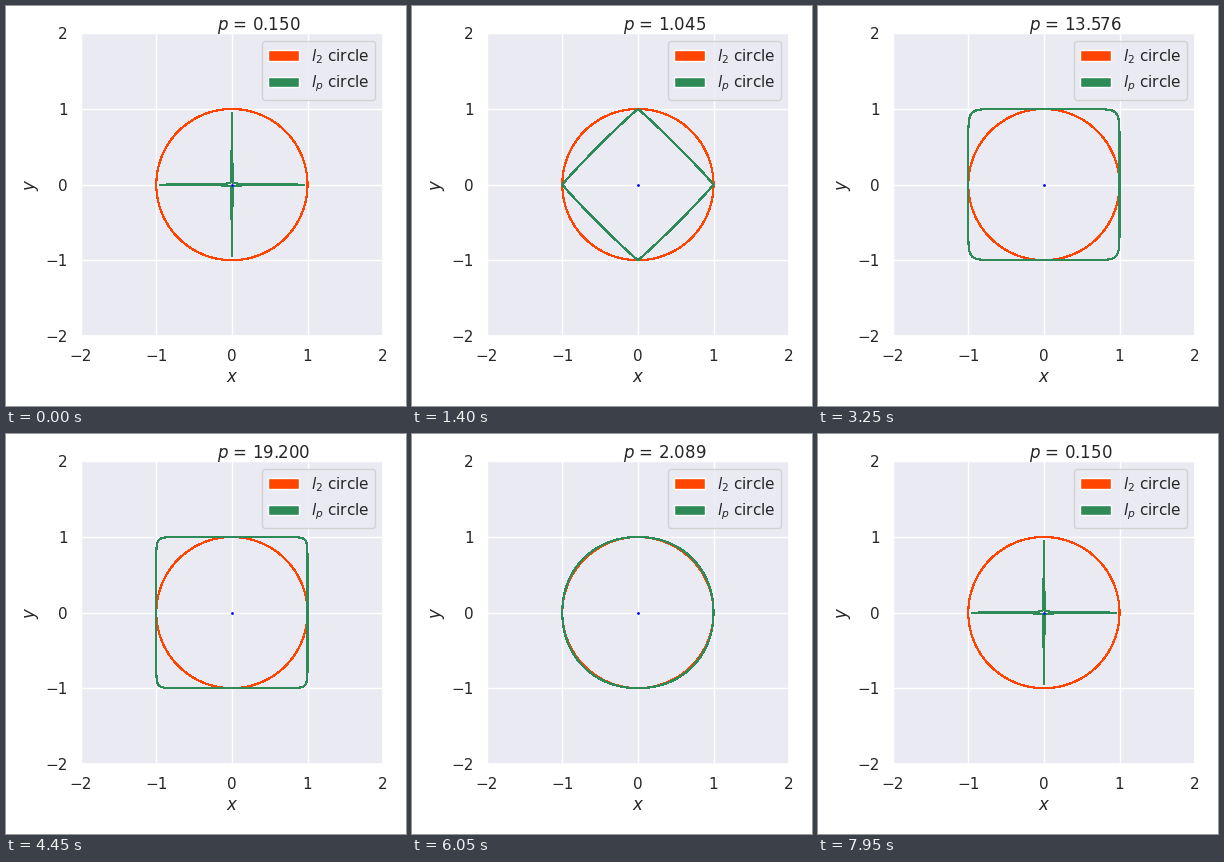
Recreate the animation shown at these times as a matplotlib script. Size 400 px wide and 400 px high, loop 8 s.

```python
import numpy as np
import matplotlib.pyplot as plt
from matplotlib.animation import FuncAnimation
from matplotlib.patches import Patch

FRAMES, INTERVAL = 160, 50
LAST_STEP = 76
SIZE = 400
INK = "0.15"

plt.rcParams.update({
    "font.family": "DejaVu Sans", "font.size": 12,
    "axes.labelsize": 12, "legend.fontsize": 11,
    "xtick.labelsize": 11, "ytick.labelsize": 11,
    "text.color": INK, "axes.labelcolor": INK,
    "xtick.color": INK, "ytick.color": INK,
    "axes.facecolor": "#EAEAF2", "axes.edgecolor": "white",
    "axes.linewidth": 1.25, "axes.grid": True, "axes.axisbelow": True,
    "axes.labelpad": 3,
    "grid.color": "white", "grid.linewidth": 1,
    "xtick.bottom": False, "ytick.left": False,
    "xtick.major.size": 6, "ytick.major.size": 6,
})

fig = plt.figure(figsize=(SIZE / 100, SIZE / 100), dpi=100)
side = 302.4 / SIZE
ax = fig.add_axes([74.7 / SIZE, 70.2 / SIZE, side, side])
ax.set(xlim=(-2, 2), ylim=(-2, 2), xlabel="$x$", ylabel="$y$",
       xticks=range(-2, 3), yticks=range(-2, 3))

# The accumulated rounding near zero shortens the spikes at small p.
axis = np.arange(-2, 2.01, 0.025)
absx, absy = np.abs(axis)[None, :], np.abs(axis)[:, None]


def unit_circle(p, color):
    return ax.contour(axis, axis, absx**p + absy**p, levels=[1],
                      colors=[color], linewidths=0.8, antialiased=False)


unit_circle(2, "orangered")
ax.plot(0, 0, "o", color="blue", ms=2, mew=0, zorder=3)
ax.legend(handles=[Patch(fc="orangered", ec="white", label="$l_2$ circle"),
                   Patch(fc="seagreen", ec="white", label="$l_p$ circle")],
          loc="upper right")
label = ax.text(-0.2, 2.05, "")
curve = None


def update(i):
    global curve
    step = min(i, FRAMES - 1 - i, LAST_STEP)
    p = 0.15 * 2 ** (step / 10)
    if curve is not None:
        curve.remove()
    curve = unit_circle(p, "seagreen")
    label.set_text(f"$p$ = {p:.3f}")


anim = FuncAnimation(fig, update, frames=FRAMES, interval=INTERVAL,
                     init_func=lambda: None, repeat=True, repeat_delay=0)
plt.show()
```
